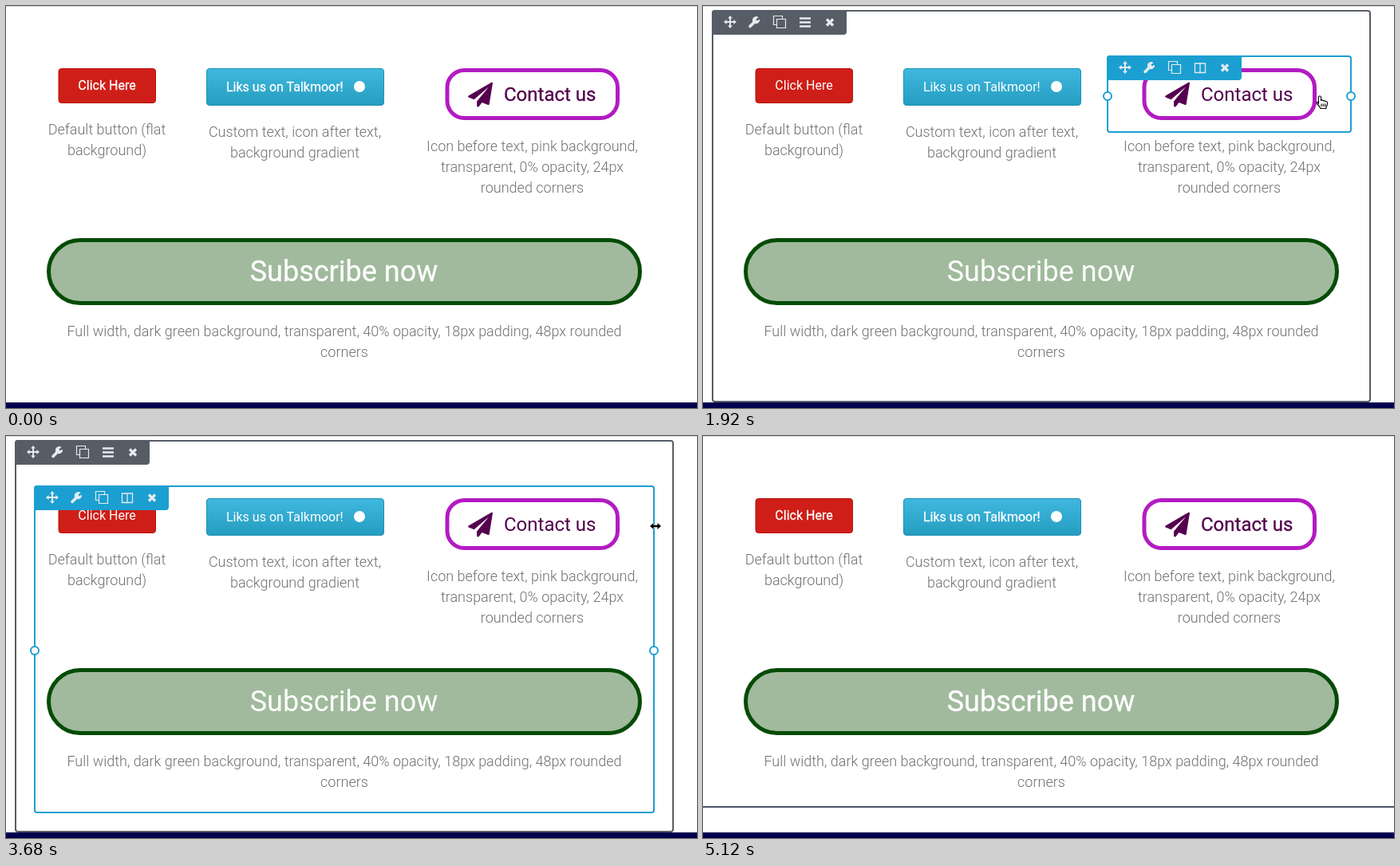
Animation, 866 px wide and 504 px high, one loop 6.4 s. Source, as an HTML page:

```html
<!DOCTYPE html>
<html lang="en">
<head>
<meta charset="utf-8">
<title>Button styles</title>
<style>
  html, body { margin: 0; width: 100%; height: 100%; overflow: hidden; background: #fff; }
  svg { display: block; font-family: Roboto, sans-serif; }
  .caption { font-size: 18px; font-weight: 300; fill: #707070; text-anchor: middle; }
  .label { font-size: 16px; fill: #fff; stroke: #fff; }
  .label, #contact { stroke-width: 0; }
  .smooth .label, .smooth #contact { stroke-width: .3px; }
  .hidden { display: none; }
</style>
</head>
<body>
<svg width="866" height="504" viewBox="0 0 866 504">
  <defs>
    <linearGradient id="sky" x2="0" y2="1">
      <stop stop-color="#40b8df"/><stop offset="1" stop-color="#259dc0"/>
    </linearGradient>
    <g id="icons" fill="none" stroke-width="2">
      <g id="move">
        <path d="M17 15H29M23 9V21"/>
        <path d="M23 7l3 3.6h-6zM23 23l3-3.6h-6zM15 15l3.6-3v6zM31 15l-3.6-3v6z" fill="currentColor" stroke="none"/>
      </g>
      <path d="M48 20.5L54.500 14" stroke-width="3.600" stroke-linecap="round"/>
      <path d="M58.500 9.200L55.500 11.500 56.500 13.500 60 11.800A4.600 4.600 0 1 1 58.500 9.200Z" fill="currentColor" stroke="none"/>
      <path d="M81.500 11.500h11v11h-11zM81.500 18.500h-4v-11h11v4" stroke-width="1.200"/>
      <path d="M144 11.500l8 8M152 11.500l-8 8" stroke-width="3.200"/>
    </g>
    <path id="bars" d="M110 10.500h14M110 15.500h14M110 20.500h14" stroke-width="2.400"/>
    <path id="columns" d="M110.500 10h13v11.500h-13zM117 10v11" fill="none" stroke-width="1.300"/>
  </defs>

  <rect width="866" height="504" fill="#fff"/>
  <rect width="866" height="1" fill="#d8d8d8"/>
  <rect y="497" width="866" height="7" fill="#00004d"/>

  <g id="page">
    <rect x="66" y="78.500" width="121.500" height="43" rx="3.500" fill="#cf1e17" stroke="#b5130e"/>
    <text class="label" x="126.500" y="105" text-anchor="middle">Click Here</text>

    <rect x="251.500" y="78.500" width="222" height="46" rx="3.500" fill="url(#sky)" stroke="#2190b4"/>
    <text class="label" x="276" y="107">Liks us on Talkmoor!</text>
    <circle cx="443" cy="101" r="7" fill="#fff"/>

    <rect x="553" y="80.500" width="213.500" height="60" rx="21.500" fill="#fff" stroke="#b31bc2" stroke-width="5"/>
    <path transform="translate(579 95.500)" fill="#55004f"
      d="M31.100.4L26.600 28 25.800 28.700 17.500 25.400 13.500 30.700 12 31 11.100 30V24L26.200 5.700 7.600 21.700.7 18.900 0 17.800.6 16.900 29.500.2Z"/>
    <text id="contact" x="624" y="119" font-size="24" fill="#52004c" stroke="#52004c">Contact us</text>

    <rect x="53.500" y="293.500" width="741" height="79" rx="39.500" fill="#a1ba9d" stroke="#054b06" stroke-width="5"/>
    <text class="label" x="423.500" y="345" text-anchor="middle" style="font-size:36px">Subscribe now</text>
    <g id="captions"></g>
  </g>

  <g id="row"></g>
  <g id="module"></g>
  <g id="column"></g>
  <rect id="divider" y="464" width="866" height="2"/>

  <g id="cursor">
    <circle id="press" r="16.500" fill="#fff" stroke="#000"/>
    <path id="arrow" d="M0 0V13.500L3.100 10.600 5.500 16 8 15 5.700 9.800H9.800Z" stroke="#fff" stroke-width="1" stroke-linejoin="round"/>
    <path id="hand" fill="#fff" stroke="#000" stroke-width="1.100" stroke-linejoin="round"
      d="M-1.500 9.500V1Q0-1.500 1.500 1V5.500Q3 4 4.500 6Q6.200 5 7 6.800Q9.500 6 9.500 9Q9.500 12 8 13.500V15.500H1Q0 13-3.500 9.500Q-4.500 7-2.500 7.500ZM2 9.500v3.500M4.300 9.500v3.500M6.600 9.500v3.500"/>
    <path id="resize" d="M-7 0L-2.500-4V-1.200H2.500V-4L7 0 2.500 4V1.200H-2.500V4Z" stroke="#fff" stroke-width="1" paint-order="stroke"/>
  </g>
</svg>
<script>
const LOOP = 6400, STEP = 80;
const BLUE = '#1b9fd1', SLATE = '#565d66';
const $ = id => document.getElementById(id);
const show = (id, on) => $(id).classList.toggle('hidden', !on);

const captions = [
  [126.5, 161, 'Default button (flat', 'background)'],
  [362, 164, 'Custom text, icon after text,', 'background gradient'],
  [659.5, 182, 'Icon before text, pink background,', 'transparent, 0% opacity, 24px', 'rounded corners'],
  [424, 414, 'Full width, dark green background, transparent, 40% opacity, 18px padding, 48px rounded', 'corners']
];
$('captions').innerHTML = captions.map(([x, y, ...lines]) => lines.map((line, i) =>
  `<text class="caption" x="${x}" y="${y + i * 26}">${line}</text>`).join('')).join('');

// Editor outline with its toolbar; handleY adds a drag handle on both sides.
function outline(id, x, y, w, h, lastIcon, handleY) {
  const handle = cx => `<circle cx="${cx}" cy="${handleY}" r="5" fill="#fff"/>`;
  $(id).innerHTML = `
    <g fill="none" stroke="currentColor" stroke-width="2">
      <rect x="${x + 1}" y="${y + 1}" width="${w - 2}" height="${h - 2}" rx="3"/>
      ${handleY ? handle(x + 1) + handle(x + w - 1) : ''}
    </g>
    <g transform="translate(${x} ${y})">
      <path d="M4 0H169V27Q169 31 165 31H0V4Q0 0 4 0Z" fill="currentColor"/>
      <g color="#e3ebef" stroke="#e3ebef"><use href="#icons"/><use href="#${lastIcon}"/></g>
    </g>`;
  $(id).style.color = BLUE;
}
outline('row', 11, 5, 826, 492, 'bars');
outline('module', 506, 62, 307, 97, 'columns', 113);
outline('column', 35, 62, 778, 411, 'columns', 269);

// Pointer path: time, x, y, shape
const pointer = [
  [1200, 846, 123, 'arrow'], [1280, 833, 121, 'arrow'], [1360, 818, 119, 'arrow'],
  [1440, 804, 117, 'arrow'], [1600, 785, 115, 'arrow'], [1760, 775, 114, 'hand'],
  [1920, 773, 113, 'hand'], [2000, 778, 111, 'arrow'], [2160, 802, 110, 'arrow'],
  [2240, 812, 112.5, 'resize'], [2400, 814, 113, 'resize'], [4000, 814, 113, 'resize'],
  [4080, 823, 111, 'arrow'], [4160, 852, 117, 'arrow'], [4240, 852, 117, '']
];

function pointerAt(t) {
  const i = pointer.findLastIndex(p => p[0] <= t);
  if (i < 0) return [0, 0, ''];
  const [t0, x, y, shape] = pointer[i];
  const [t1, nx, ny] = pointer[i + 1] || [t0 + 1, x, y];
  const k = Math.min(1, (t - t0) / (t1 - t0));
  return [x + (nx - x) * k, y + (ny - y) * k, shape];
}

function mix(k) {
  const from = [27, 159, 209], to = [76, 84, 102];
  return `rgb(${from.map((c, i) => Math.round(c + (to[i] - c) * k))})`;
}

function draw(time) {
  const t = Math.floor(time % LOOP / STEP) * STEP;
  const within = (a, b) => t >= a && t < b;

  $('page').classList.toggle('smooth', !within(1280, 4560));
  show('row', within(1280, 4160));
  $('row').style.color = within(1440, 4080) ? SLATE : BLUE;
  show('module', within(1440, 2480));
  show('column', within(2480, 4080));

  show('divider', t >= 4560);
  $('divider').setAttribute('fill', mix(Math.max(0, Math.min(1, (t - 4800) / 320))));

  const [x, y, shape] = pointerAt(t);
  $('cursor').setAttribute('transform', `translate(${x} ${y})`);
  for (const id of ['arrow', 'hand', 'resize']) show(id, id === shape);
  show('press', within(2400, 3680));
  $('press').setAttribute('r', 16.5 * Math.min(1, .7 + (t - 2400) / 800));
}

const start = performance.now();
function tick() {
  draw(performance.now() - start);
  requestAnimationFrame(tick);
}
tick();
</script>
</body>
</html>
```
